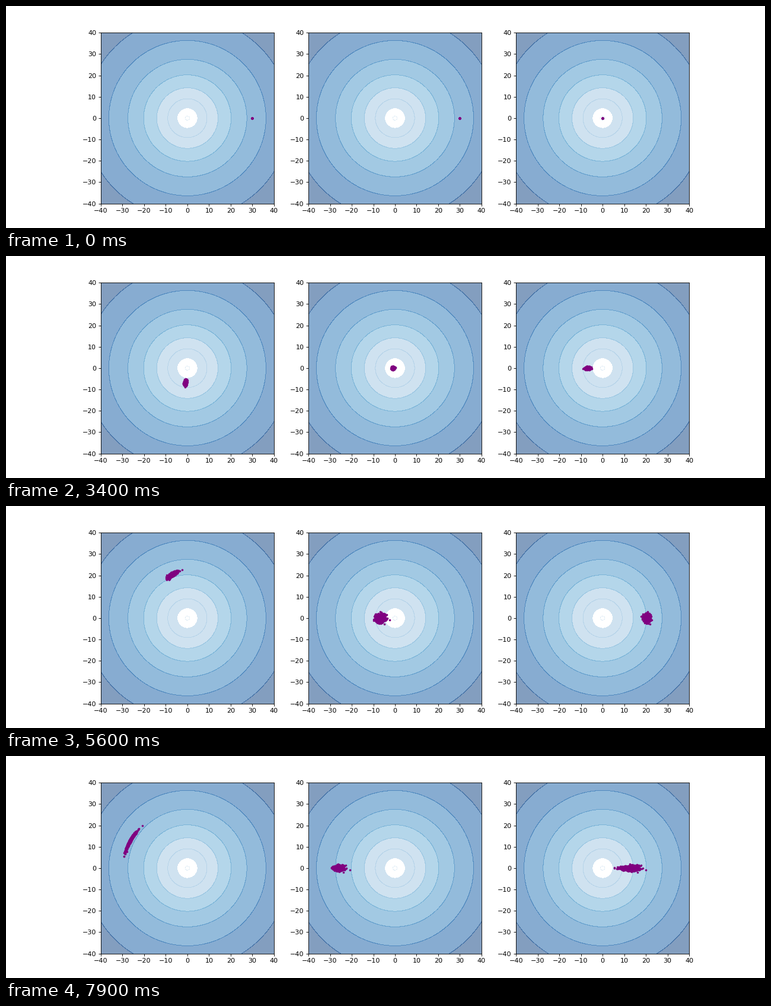
Write a matplotlib script that moves like this. It is 1280 px wide and 376 px high and loops after 8000 ms.

```python
import numpy as np
import matplotlib.pyplot as plt
from matplotlib.animation import FuncAnimation

FRAMES, INTERVAL = 80, 100
SUBSTEPS = 50
HALF = 40

# NFW halo: scale radius and potential depth, time counted in frames
R_S, DEPTH = 30.0, 363.0

# Star cluster: start, mean velocity and velocity dispersion
N_STARS = 1000
START = (30.0, 0.0, 0.0)
VELOCITY = (1.35, 1.016, 0.0)
SIGMA = 0.044


def potential(r):
    x = r / R_S
    return -np.log1p(x) / x


def acceleration(pos):
    r = np.linalg.norm(pos, axis=1, keepdims=True)
    x = r / R_S
    pull = DEPTH / R_S * (np.log1p(x) - x / (1 + x)) / x**2
    return -pull * pos / r


def simulate():
    """Leapfrog orbits; returns star positions for every frame."""
    rng = np.random.default_rng(4)
    pos = np.tile(START, (N_STARS, 1))
    vel = np.array(VELOCITY) + SIGMA * rng.standard_normal((N_STARS, 3))
    dt = 1 / SUBSTEPS
    track = [pos.copy()]
    for _ in range(FRAMES - 1):
        for _ in range(SUBSTEPS):
            pos += vel * dt / 2
            vel += acceleration(pos) * dt
            pos += vel * dt / 2
        track.append(pos.copy())
    return track


def draw_halo(ax):
    side = np.linspace(-HALF, HALF, 100)
    gx, gy = np.meshgrid(side, side)
    phi = potential(np.hypot(gx, gy))
    levels = -0.0546 * np.arange(19, 9, -1)
    blues = plt.get_cmap("Blues")
    colors = ["white"] * 2 + ["#a1c7e3"] * 2
    colors += [blues((k + 0.5) / 9) for k in range(4, 9)]
    # Half-transparent bands overlap by a pixel, which gives the thin rings
    ax.contourf(gx, gy, phi, levels=levels, colors=colors, alpha=0.5)
    ax.contour(gx, gy, phi, levels=[levels[1]], colors="#d0e3f1",
               linewidths=0.7)


def make_panel(ax):
    draw_halo(ax)
    ticks = np.arange(-HALF, HALF + 1, 10)
    ax.set(xlim=(-HALF, HALF), ylim=(-HALF, HALF), xticks=ticks, yticks=ticks)
    return ax.plot([], [], "o", color="purple", ms=2.2, mew=1)[0]


fig, axes = plt.subplots(1, 3, figsize=(16, 4.7), dpi=80)
dots = [make_panel(ax) for ax in axes]
PLANES = ((0, 1), (0, 2), (1, 2))
track = simulate()


def update(i):
    for line, (a, b) in zip(dots, PLANES):
        line.set_data(track[i][:, a], track[i][:, b])
    return dots


anim = FuncAnimation(fig, update, frames=FRAMES, interval=INTERVAL, repeat=True)
plt.show()
```
